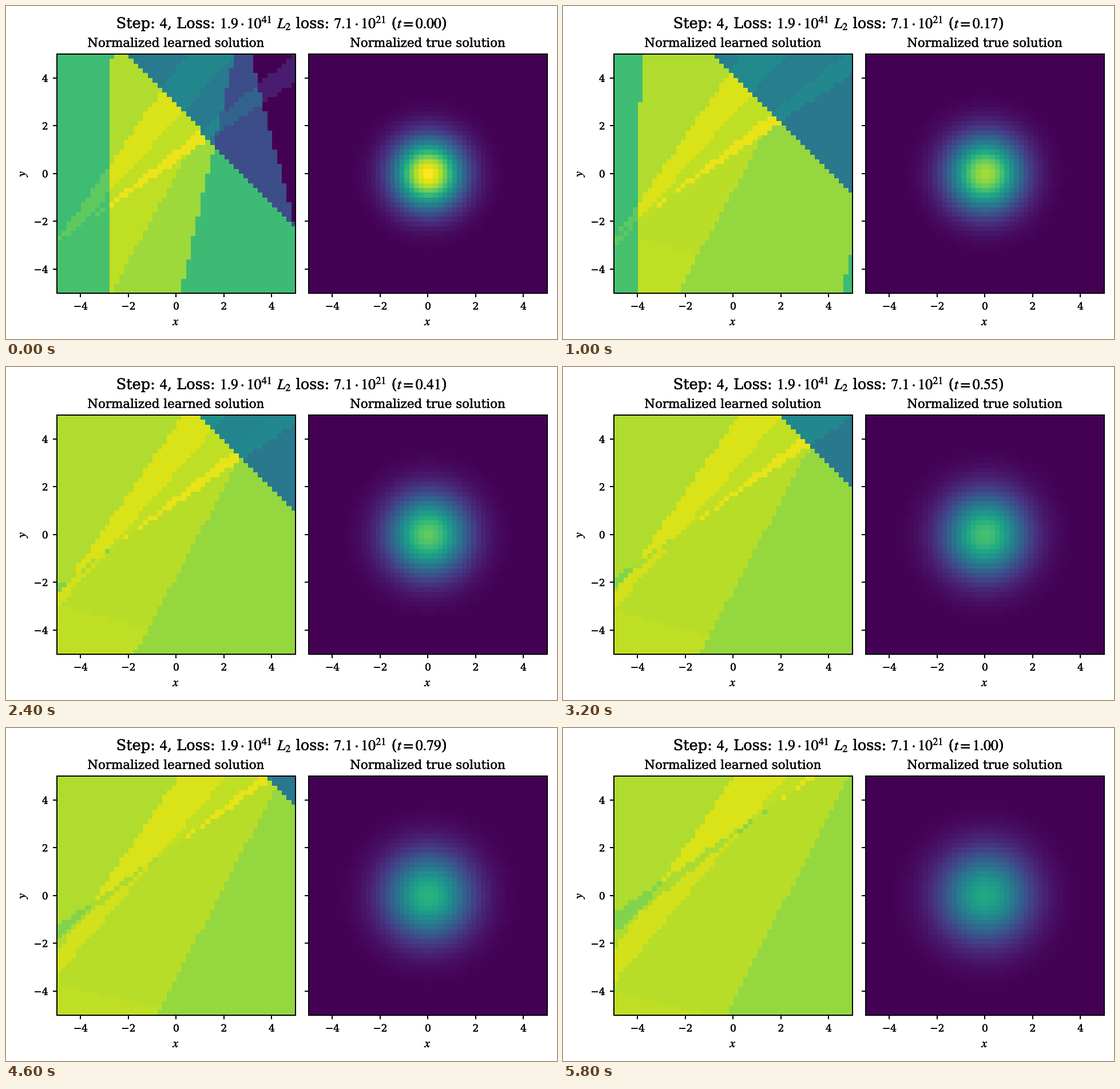
A matplotlib script for the animation above (6 s loop, 963 px wide and 582 px high).

```python
import numpy as np
import matplotlib.pyplot as plt
from matplotlib.animation import FuncAnimation
from matplotlib.patheffects import withStroke
from matplotlib.text import Text

W, H, DPI = 963, 582, 144
FRAMES, CELLS = 30, 50
PT = 1.07  # scale of all sizes given in points
SIDE, BOTTOM = 417.5, 501.7

plt.rcParams.update({
    "font.family": "DejaVu Serif",
    "mathtext.fontset": "stix",
    "axes.linewidth": 1,
    "axes.titlesize": 10 * PT,
    "axes.titlepad": 6 * PT,
    "axes.labelsize": 10 * PT,
    "axes.labelpad": 4 * PT,
})
for k in ("xtick", "ytick"):
    plt.rcParams.update({
        f"{k}.labelsize": 8 * PT,
        f"{k}.major.size": 3.5 * PT,
        f"{k}.major.width": 1,
        f"{k}.major.pad": 3.5 * PT,
    })

c = -5 + 10 * (np.arange(CELLS) + 0.5) / CELLS
X, Y = np.meshgrid(c, c)


def learned(t):
    # long band, and two rays that cross at a point moving right
    top = 4.38 + 0.56 * t + 1.44 * X
    low = 2.3 + 1.3 * t - 1.25 * t**2 + (1.1 + 0.1 * t) * X
    ray_a = 1 + 1.45 * t + 0.8 * X
    ray_b = ray_a - (0.5 - 0.25 * t - 0.45 * t**2 + 0.12 * X)
    band = (Y < top) & (Y > low)
    ray = 1.0 * ((Y < ray_a) & (Y > ray_b)) - ((Y > ray_a) & (Y < ray_b))

    # edges sweeping across the plane
    above = Y > 2.81 + 7.38 * t - 1.01 * X
    left = X < -2.796 - 6.75 * t + 0.02 * Y
    right = X > 1.3 + 25.2 * t + 0.225 * Y
    corner = X > 4.38 + 12.3 * t - 0.255 * Y
    beyond = X > -2.75 + 2.4 * t + (0.55 - 0.03 * t) * (Y + 5)
    glow = Y < -2.2 - 1.8 * t - 0.25 * (X + 5)

    # yellow and green below the diagonal
    z = np.where(glow, 0.906, 0.906 - 0.013 * min(1, 4 * t))
    z = np.where(Y > top, 0.88, z)
    z = np.where((Y < low) & (Y > np.maximum(ray_a, ray_b)), 0.905, z)
    z = np.where(beyond & (Y < ray_b), 0.843 + 0.012 * max(0, 1 - 8 * t), z)
    z = np.where(band, np.where(Y > ray_a, 0.943, 0.93), z)
    z = np.minimum(z + 0.07 * ray, 0.97)
    green = np.where(Y > top, 0.69, 0.71) + 0.04 * band + 0.045 * ray
    z = np.where(left, green, z)
    z = np.where(right, 0.685, z)

    # blue and purple above it
    teal = (np.where(Y > ray_a, 0.41 + 0.1 * t, 0.40)
            + 0.05 * band + 0.065 * ray)
    blue = 0.235 + 0.085 * ray
    upper = np.where(right & corner, 0.08 * ray,
                     np.where(right | corner, blue, teal))
    return np.where(above, upper, z)


def true(t):
    var = 1 + 2 / 3 * t**0.8
    return np.exp(-(X**2 + Y**2 - 0.02) / (2 * var)) / var


def heading(t):
    return (r"Step: $4$, Loss: $1.9\cdot 10^{41}$ $L_2$ loss: "
            rf"$7.1\cdot 10^{{21}}$ ($t={t:.2f}$)")


def panel(x, title):
    ax = fig.add_axes([x / W, 1 - BOTTOM / H, SIDE / W, SIDE / H])
    im = ax.imshow(true(0), origin="lower", extent=(-5, 5, -5, 5),
                   cmap="viridis", vmin=0, vmax=1,
                   interpolation="nearest", aspect="auto")
    ax.set_xticks(range(-4, 5, 2))
    ax.set_yticks(range(-4, 5, 2))
    ax.tick_params(axis="x", pad=4.1)
    ax.set_title(title)
    ax.set_xlabel("$x$")
    return ax, im


fig = plt.figure(figsize=(W / DPI, H / DPI), dpi=DPI, facecolor="white")
ax1, im1 = panel(88.7, "Normalized learned solution")
ax2, im2 = panel(528.7, "Normalized true solution")
ax1.set_ylabel("$y$")
ax2.tick_params(labelleft=False)
head = fig.text(481.2 / W, 1 - 38.7 / H, heading(0), fontsize=12 * PT,
                ha="center", va="baseline")

# slightly heavier lettering
for label in fig.findobj(Text):
    label.set_path_effects([withStroke(linewidth=0.22, foreground="black")])


def update(i):
    t = i / (FRAMES - 1)
    im1.set_data(learned(t))
    im2.set_data(true(t))
    head.set_text(heading(t))
    return im1, im2, head


anim = FuncAnimation(fig, update, frames=FRAMES, interval=200,
                     repeat=True, blit=False)
plt.show()
```
